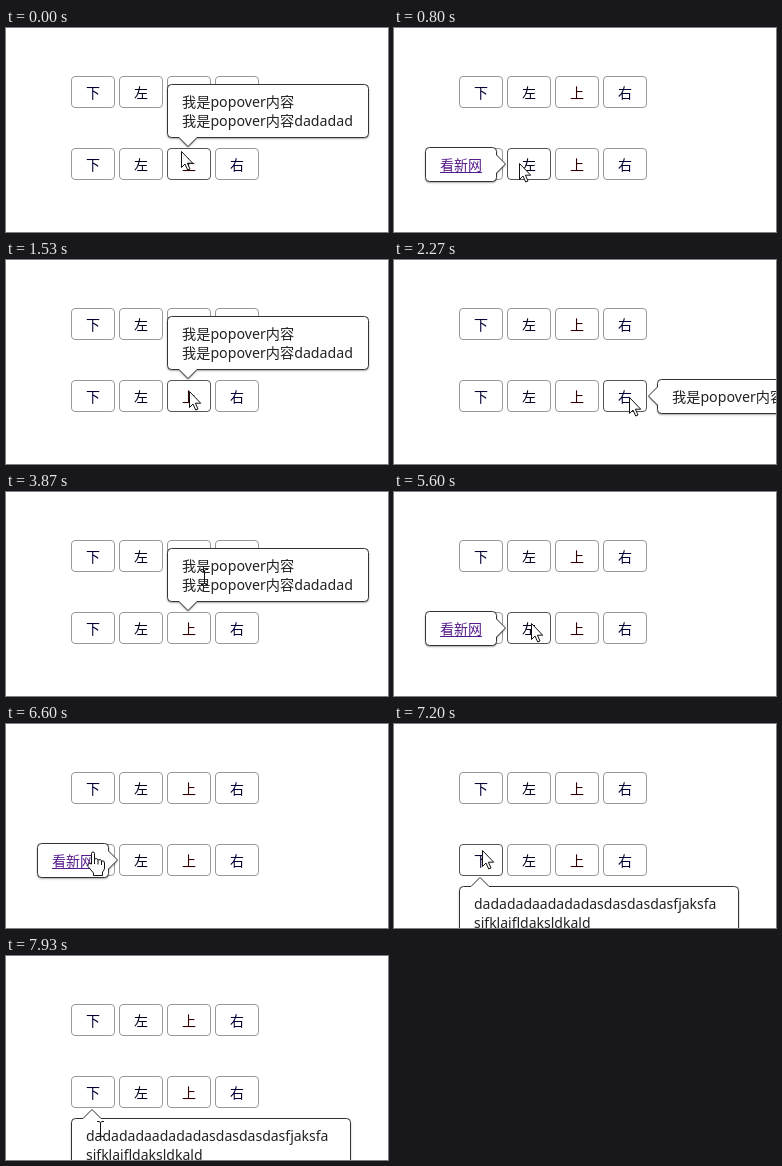
Recreate the animation shown at these times as an HTML page with a canvas. Size 382x204 px, loop 8000 ms.

```html
<!DOCTYPE html>
<html lang="zh-CN">
<head>
<meta charset="utf-8">
<style>
  html, body { margin: 0; width: 100%; height: 100%; overflow: hidden; background: #fff; }
  canvas { display: block; }
</style>
</head>
<body>
<canvas id="stage" width="382" height="204"></canvas>
<script>
const ctx = document.getElementById('stage').getContext('2d');
const STEPS = 120, STEPS_PER_MS = 0.015;
const FONT = '"Noto Sans", "Noto Sans CJK SC", sans-serif';

const buttons = [48, 120].flatMap(y =>
  [['下', '#000033'], ['左', '#000022'], ['上', '#330000'], ['右', '#000033']]
    .map(([label, color], i) => ({ x: 65 + i * 48, y, w: 44, h: 32, label, color })));

const popovers = {
  top: { x: 161, y: 56, w: 202, h: 54, side: 'bottom', at: 182, size: 14.2,
         lines: ['我是popover内容', '我是popover内容dadadad'] },
  left: { x: 31, y: 119, w: 72, h: 35, side: 'right', at: 136, size: 14, lines: ['看新网'], link: true },
  right: { x: 263, y: 119, w: 202, h: 35, side: 'left', at: 136, size: 14.2, lines: ['我是popover内容'] },
  bottom: { x: 65, y: 162, w: 280, h: 54, side: 'top', at: 86, size: 14,
            lines: ['dadadadaadadadasdasdasdasfjaksfa', 'sifklaifldaksldkald'] },
};

// [step, popover shown from then on]
const shown = [[0, 'top'], [6, 'left'], [21, 'top'], [32, 'right'], [42, 'top'],
               [71, null], [81, 'left'], [103, null], [107, 'bottom']];

// [step, x, y] of the pointer
const path = [[0, 175, 123], [8, 137, 134], [9, 137, 134], [17, 98, 136], [18, 98, 136],
  [23, 183, 131], [26, 185, 133], [29, 185, 133], [34, 235, 137], [39, 235, 137],
  [45, 183, 133], [47, 183, 133], [51, 198, 84], [57, 198, 84], [58, 198, 85],
  [66, 269, 72], [68, 269, 72], [72, 285, 22], [75, 285, 22], [76, 259, 44],
  [84, 137, 131], [87, 137, 131], [96, 90, 130], [98, 90, 130], [99, 87, 128],
  [104, 88, 87], [109, 88, 131], [113, 88, 131], [119, 94, 173]];

function pointerAt(step) {
  const next = path.findIndex(p => p[0] >= step);
  if (next === 0) return path[0].slice(1);
  const [t0, x0, y0] = path[next - 1], [t1, x1, y1] = path[next];
  const u = (step - t0) / (t1 - t0), e = u * u * (3 - 2 * u);
  return [Math.round(x0 + (x1 - x0) * e), Math.round(y0 + (y1 - y0) * e)];
}

const inside = (r, x, y) => x >= r.x && x < r.x + r.w && y >= r.y && y < r.y + r.h;

function text(str, x, y, size, color) {
  ctx.font = `${size}px ${FONT}`;
  ctx.fillStyle = color;
  ctx.fillText(str, x, y);
}

function drawButton(b, hovered) {
  ctx.beginPath();
  ctx.roundRect(b.x + 0.5, b.y + 0.5, b.w - 1, b.h - 1, 3.5);
  ctx.strokeStyle = hovered ? '#555' : '#999';
  ctx.stroke();
  text(b.label, b.x + 15, b.y + 22, 14, b.color);
}

function popoverOutline({ x, y, w, h, side, at }) {
  const r = 4, a = 9, l = x + 0.5, t = y + 0.5, R = x + w - 0.5, B = y + h - 0.5;
  const p = new Path2D();
  p.moveTo(l + r, t);
  if (side === 'top') { p.lineTo(at - a, t); p.lineTo(at, t - a); p.lineTo(at + a, t); }
  p.arcTo(R, t, R, B, r);
  if (side === 'right') { p.lineTo(R, at - a); p.lineTo(R + a, at); p.lineTo(R, at + a); }
  p.arcTo(R, B, l, B, r);
  if (side === 'bottom') { p.lineTo(at + a, B); p.lineTo(at, B + a); p.lineTo(at - a, B); }
  p.arcTo(l, B, l, t, r);
  if (side === 'left') { p.lineTo(l, at + a); p.lineTo(l - a, at); p.lineTo(l, at - a); }
  p.arcTo(l, t, R, t, r);
  p.closePath();
  return p;
}

function drawPopover(pop) {
  const outline = popoverOutline(pop);
  ctx.save();
  ctx.shadowColor = 'rgba(0,0,0,.5)';
  ctx.shadowBlur = 2;
  ctx.shadowOffsetY = 1;
  ctx.fillStyle = '#fff';
  ctx.fill(outline);
  ctx.restore();
  ctx.strokeStyle = '#333';
  ctx.stroke(outline);
  const color = pop.link ? '#551a8b' : '#222';
  pop.lines.forEach((line, i) => text(line, pop.x + 15, pop.y + 23 + i * 19, pop.size, color));
  if (pop.link) ctx.fillRect(pop.x + 15, pop.y + 25, 42, 1);
}

const shapes = {
  arrow: new Path2D('M.5.5V16.5L4 13l2.7 6 2.3-1-2.6-5.8H11.7Z'),
  hand: new Path2D('M-1.5 12V1.5Q-1.5 0 0 0T1.5 1.5V7Q4.5 5.5 5 8 8 6.5 8.5 9 11.5 8 11.5 11V16' +
    'Q11.5 18 9.5 20V23.5H.5V21L-5 14.5Q-6 12 -3.5 11.5Z'),
  handLines: new Path2D('M1.5 7V12M5 8V12.5M8.5 9V13'),
  beam: new Path2D('M-3-7.5H-1L.5-6.5 2-7.5H4M.5-6.5V6.5M-3 7.5H-1L.5 6.5 2 7.5H4'),
};

function drawPointer(x, y, kind) {
  ctx.save();
  ctx.translate(x, y);
  ctx.strokeStyle = '#111';
  ctx.fillStyle = '#fff';
  if (kind !== 'beam') ctx.fill(shapes[kind]);
  ctx.stroke(shapes[kind]);
  if (kind === 'hand') ctx.stroke(shapes.handLines);
  ctx.restore();
}

function pointerKind(pop, x, y) {
  if (!pop) return 'arrow';
  const textBox = { x: pop.x + 15, y: pop.y + 8, w: pop.link ? 42 : pop.w - 30, h: pop.h - 16 };
  if (!inside(textBox, x, y)) return 'arrow';
  return pop.link ? 'hand' : 'beam';
}

function draw(now) {
  const step = Math.floor(now * STEPS_PER_MS + 0.06) % STEPS;
  const [x, y] = pointerAt(step);
  const pop = popovers[shown.findLast(s => s[0] <= step)[1]];
  const covered = pop && inside(pop, x, y);
  ctx.fillStyle = '#fff';
  ctx.fillRect(0, 0, 382, 204);
  buttons.forEach(b => drawButton(b, !covered && inside(b, x, y)));
  if (pop) drawPopover(pop);
  drawPointer(x, y, pointerKind(pop, x, y));
}

const start = performance.now();
function tick() {
  draw(performance.now() - start);
  requestAnimationFrame(tick);
}
tick();
</script>
</body>
</html>
```
